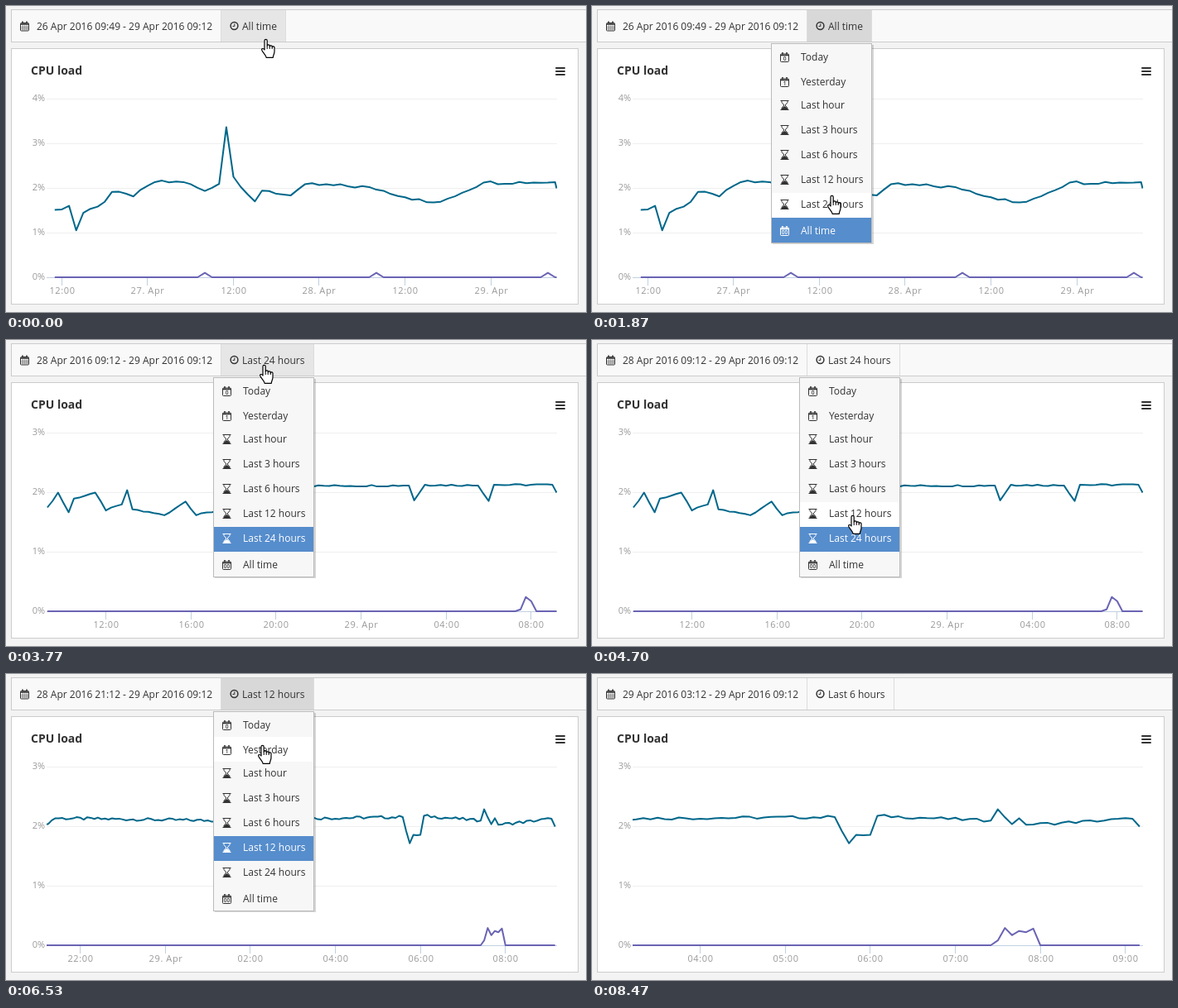
These frames come from a looping animation (700 px wide and 370 px high, 8.73 s). An HTML page:

```html
<!DOCTYPE html>
<html lang="en">
<head>
<meta charset="utf-8">
<title>CPU load</title>
<style>
  html, body { margin: 0; width: 100%; height: 100%; overflow: hidden; background: #f3f3f3; }
  svg { display: block; width: 700px; height: 370px; font: 12px "Open Sans", "Noto Sans", sans-serif; }
  .axis text { font-size: 11px; fill: #999; }
  .axis .time { letter-spacing: .6px; text-anchor: middle; }
  .line { fill: none; stroke-width: 2; stroke-linejoin: round; }
</style>
</head>
<body>
<svg viewBox="0 0 700 370" fill="#333">
  <defs>
    <clipPath id="plot"><rect x="49" y="100" width="616.5" height="231"/></clipPath>
    <g id="sheet" fill="none" stroke="currentColor">
      <rect x="-5" y="-4" width="10" height="9.5" rx="1"/>
      <path d="M-5 -2.5H5" stroke-width="1.6"/>
      <path d="M-2.5 -6V-3.5M2.5 -6V-3.5" stroke-width="1.6"/>
    </g>
    <g id="glass" stroke="currentColor" fill="none">
      <path d="M-5 -5.5H5M-5 5.5H5" stroke-width="1.2"/>
      <path d="M-3.5 -5V-3.5L-.6 0L-3.5 3.5V5M3.5 -5V-3.5L.6 0L3.5 3.5V5"/>
      <path d="M-3.5 5V3.5L0 1L3.5 3.5V5Z" fill="currentColor" stroke="none"/>
    </g>
  </defs>

  <rect x="6.5" y="4.5" width="720" height="39" fill="#f9f9f9" stroke="#ccc"/>
  <g transform="translate(22.5 24.5)" color="#333">
    <use href="#sheet"/>
    <path d="M-5 1H5M-5 3.2H5M-2.2 -2V5M.3 -2V5M2.8 -2V5" stroke="#333" stroke-width=".5"/>
  </g>
  <text id="dates" x="37" y="28.5"></text>
  <rect id="button" x="260" y="5" height="38"/>
  <path id="edges" stroke="#ddd" fill="none"/>
  <g fill="none" stroke="#333">
    <circle cx="275.5" cy="24" r="4.4" stroke-width="1.5"/>
    <path d="M275.8 21.5V24.5H273.5"/>
  </g>
  <text id="choice" x="285" y="28.5"></text>

  <rect x="6.5" y="51.5" width="684" height="309" fill="#fff" stroke="#ccc"/>
  <g id="titleHover">
    <rect x="22" y="62" width="606" height="31" rx="15" fill="#f5f5f5"/>
    <rect x="604" y="71.5" width="12.5" height="11.5" rx="2.5" fill="none" stroke="#c4709a" stroke-width="1.4"/>
    <path d="M608.5 80.5L609.2 77L617 69.3L620 72L612 79.8Z" fill="#e07a3c" stroke="#f5f5f5" stroke-width=".6"/>
  </g>
  <text x="30" y="83" font-size="14" font-weight="700">CPU load</text>
  <path d="M664 75H674M664 79H674M664 83H674" stroke="#333" stroke-width="2" stroke-linecap="round"/>
  <g id="tools">
    <g id="move" transform="translate(648 79)"></g>
    <path d="M683 348V353H678" fill="none" stroke="#999" stroke-width="1.6"/>
  </g>

  <g id="charts"></g>
  <path id="cross" stroke="#c0c0c0"/>
  <g id="loading">
    <rect x="22" y="97" width="653" height="255" fill="#e2e2e2" opacity=".45"/>
    <rect x="290.5" y="216.5" width="116" height="18" rx="2" fill="#f2983c" stroke="#dd6b4d"/>
    <text x="348.5" y="230" text-anchor="middle" fill="#fff">Loading more data</text>
  </g>
  <g id="menu"></g>

  <g id="cursor" fill="#fff" stroke="#000" stroke-linejoin="round">
    <path id="arrow" d="M.5 .5V16.5L4.1 13L6.8 19.2L9.2 18.2L6.6 12.1H11.5Z"/>
    <g id="hand" stroke-width="1.2">
      <path d="M-1 13V2A1.6 1.6 0 0 1 2.2 2V8A1.5 1.3 0 0 1 5.2 8.2V9A1.5 1.3 0 0 1 8.2 9.2V10A1.4 1.3 0 0 1 11 10.3V15C11 18 9.6 18.6 9.2 22.4H1.2C.8 19.8 -2 17.8 -4.2 13.4C-5 11.4 -2.6 10.6 -1 13Z"/>
      <path d="M2.2 8V12M5.2 9V12M8.2 10V12" fill="none" stroke-width="1"/>
    </g>
    <g id="pencil" stroke="none">
      <path d="M0 1L8 1.5L29 18.5L30.5 24L26 27L19.5 26L2 11Z" fill="#303030"/>
      <path d="M1.5 3H6.5L8 5L4 9.5L2.5 8Z" fill="#d8d8d8"/>
      <path d="M0 0H4V4H0Z" fill="#303030"/>
      <path d="M9 6L25 20M7 10L21 22" stroke="#666" stroke-dasharray="1.5 1.5"/>
    </g>
  </g>
</svg>

<script>
const LOOP = 8730, BASE = 328, LEFT = 49, RIGHT = 665, TOP = 112;
const $ = id => document.getElementById(id);
const show = (el, on) => { el.style.display = on ? "" : "none"; };

// Seeded noise in -1..1.
function noise(i) {
  const s = Math.sin((i + 1) * 12.9898) * 43758.5453;
  return 2 * (s - Math.floor(s)) - 1;
}

// Load in percent: straight runs between turning points, roughened in between.
function trace(keys, rough) {
  const values = [];
  keys.forEach(([end, to], k) => {
    const [start, from] = keys[k - 1] || [-1, to];
    for (let i = start + 1; i < end; i++)
      values.push(from + (to - from) * (i - start) / (end - start) + rough * noise(i));
    values.push(to);
  });
  return values;
}

const threeDays = trace([[0, 1.52], [2, 1.61], [3, 1.06], [4, 1.45], [7, 1.7], [8, 1.92], [11, 1.82],
  [14, 2.14], [18, 2.14], [21, 1.94], [23, 2.1], [24, 3.37], [25, 2.26], [28, 1.71], [29, 1.95],
  [33, 1.84], [35, 2.09], [44, 2.03], [52, 1.69], [54, 1.7], [60, 2.13], [70, 2.14]], .04);
const oneDay = trace([[0, 1.75], [2, 2], [4, 1.67], [5, 1.9], [9, 2], [11, 1.7], [14, 1.8], [15, 2.04],
  [16, 1.72], [22, 1.62], [26, 1.85], [28, 1.62], [39, 1.83], [41, 2.09], [43, 1.89], [46, 2.11],
  [68, 2.12], [69, 1.87], [71, 2.13], [81, 2.12], [83, 1.86], [84, 2.13], [95, 2.13]], .015);
const halfDay = trace([[0, 2.03], [3, 2.14], [62, 2.09], [63, 1.78], [64, 1.74], [66, 2.13], [101, 2.16],
  [103, 1.72], [104, 1.86], [106, 1.86], [107, 2.18], [123, 2.1], [124, 2.29], [126, 2.04],
  [127, 2.14], [128, 2.03], [143, 2.13], [144, 2]], .025);
const burst = i => [.08, .29, .17, .24, .22, .28][i] || 0;

// Hours count from 26 Apr 00:00; tick is the x of the first label, gap the distance between labels.
const charts = [
  { name: "All time", row: 7, from: "26 Apr 2016 09:49", edge: 337.5, max: 4, hour: 12, step: 12, tick: 67.45, gap: 103.515,
    first: 11, every: 1, load: threeDays, low: i => i % 24 === 21 ? .1 : 0, last: 2 },
  { name: "Last 24 hours", row: 6, from: "28 Apr 2016 09:12", edge: 371.5, max: 3, hour: 60, step: 4, tick: 120.5, gap: 102.66,
    first: 57.25, every: 1 / 4, load: oneDay, low: i => [.03, .24, .17][i - 89] || 0, last: 2 },
  { name: "Last 12 hours", row: 5, from: "28 Apr 2016 21:12", edge: 371.5, max: 3, hour: 70, step: 2, tick: 89.5, gap: 102.66,
    first: 69 + 1 / 6, every: 1 / 12, load: halfDay, low: i => burst(i - 124) },
  { name: "Last 6 hours", row: 4, from: "29 Apr 2016 03:12", edge: 364.5, max: 3, hour: 76, step: 1, tick: 130.5, gap: 102.66,
    first: 75 + 1 / 6, every: 1 / 12, load: halfDay.slice(72), low: i => burst(i - 52) }
];
const pointX = (c, i) => c.tick + (c.first + i * c.every - c.hour) * c.gap / c.step;

// Menu rounds: opened, button released, item chosen, data arrived.
const rounds = [
  { open: 470, release: 2030, pick: 2200, done: 2600 },
  { open: 3770, release: 4700, pick: 4900, done: 5300 },
  { open: 6200, release: 7230, pick: 7400, done: 7800 }
];

// Pointer stops: arrival time, x, y and, where it rests, the time it leaves.
const stops = [
  [0, 313, 40, 0], [200, 307, 32, 630], [1870, 289, 229, 2370], [2900, 291, 130],
  [3500, 311, 30, 3800], [4500, 314, 212, 4900], [5730, 301, 75], [5970, 309, 30, 6230],
  [6930, 309, 171, 7440], [8470, 74, 372, 8470]];
const leaves = stop => stop[3] ?? stop[0];

const items = ["Today", "Yesterday", "Last hour", "Last 3 hours", "Last 6 hours", "Last 12 hours", "Last 24 hours", "All time"];
const rowTop = i => 46 + 30 * i;
const isSheet = i => i < 2 || i === 7;

function timeLabel(hour) {
  const h = hour % 24;
  return h ? String(h).padStart(2, "0") + ":00" : 26 + hour / 24 + ". Apr";
}

function chartMarkup(c) {
  const unit = (BASE - TOP) / c.max;
  const line = (values, bottom) => {
    const points = values.map((v, i) => [pointX(c, i), bottom - v * unit]);
    return points.map(p => p.map(n => n.toFixed(1)));
  };
  const load = line(c.load, BASE + .5);
  if (c.last) load.push([664.5, BASE + .5 - c.last * unit]);
  const low = line(c.load.map((v, i) => c.low(i)), BASE);
  low.push([load[load.length - 1][0], BASE]);

  let axis = "";
  for (let k = 0; k <= c.max; k++) {
    const y = BASE + .5 - k * unit;
    axis += `<path d="M${LEFT} ${y}H${RIGHT}" stroke="${k ? "#efefef" : "#c0d0e0"}"/>
      <text x="47" y="${y + 2.5}" text-anchor="end">${k}%</text>`;
  }
  for (let i = 0; i < 6; i++) {
    const x = Math.floor(c.tick + i * c.gap) + .5;
    axis += `<path d="M${x} 328V338" stroke="#c0d0e0"/>
      <text class="time" x="${x + .5}" y="347.5">${timeLabel(c.hour + i * c.step)}</text>`;
  }
  return `<g><g class="axis">${axis}</g><g clip-path="url(#plot)">
    <polyline class="line" stroke="#6a64b4" points="${low.join(" ")}"/>
    <polyline class="line load" stroke="#00678a" points="${load.join(" ")}"/></g></g>`;
}

function menuMarkup() {
  const rows = items.map((name, i) => {
    const y = rowTop(i) + (isSheet(i) ? 16 : 14);
    const icon = isSheet(i)
      ? `<use href="#sheet"/><text y="4" font-size="6.5" font-weight="600" text-anchor="middle" fill="currentColor">${["0", "1"][i] || "00"}</text>`
      : `<use href="#glass"/>`;
    return `<g class="row"><rect x="1" y="${rowTop(i)}" width="120" height="30"/>
      <g transform="translate(16.5 ${y})">${icon}</g>
      <text x="36" y="${y + 4}" fill="currentColor">${name}</text></g>`;
  });
  return `<rect x="2" y="47" width="122" height="241" fill="#000" opacity=".16"/>
    <rect x=".5" y="45.5" width="121" height="241" fill="#f7f7f7" stroke="#bbb"/>${rows.join("")}`;
}

$("charts").innerHTML = charts.map(chartMarkup).join("");
$("menu").innerHTML = menuMarkup();
$("move").innerHTML = [0, 90, 180, 270].map(a =>
  `<path transform="rotate(${a})" d="M0 -7L3 -3.8H1V0H-1V-3.8H-3Z"/>`).join("");
const chartEls = [...$("charts").children];
const loadLines = chartEls.map(el => el.querySelector(".load"));
const rowEls = [...$("menu").querySelectorAll(".row")];

// Speed through a stop, zero where the pointer rests.
function slope(k, axis) {
  if (stops[k].length > 3) return 0;
  const a = stops[k - 1], b = stops[k + 1];
  return (b[axis] - a[axis]) / (b[0] - leaves(a));
}

function pointer(t) {
  const next = stops.findIndex(s => s[0] > t);
  if (next < 0) return stops[stops.length - 1].slice(1, 3);
  const a = stops[next - 1], b = stops[next], span = b[0] - leaves(a);
  const u = Math.max(0, (t - leaves(a)) / span), ease = u * u * (3 - 2 * u);
  return [1, 2].map(n => a[n] + (b[n] - a[n]) * ease
    + span * u * (1 - u) * (slope(next - 1, n) * (1 - u) - slope(next, n) * u));
}

function draw(t) {
  const [x, y] = pointer(t);
  const picked = rounds.filter(r => t >= r.pick).length;
  const loaded = rounds.filter(r => t >= r.done).length;
  const round = rounds.find(r => t >= r.open && t < r.pick);
  const choice = charts[picked];

  $("dates").textContent = choice.from + " - 29 Apr 2016 09:12";
  $("choice").textContent = choice.name;
  $("edges").setAttribute("d", `M259.5 5V43M${choice.edge} 5V43`);
  const onButton = x > 260 && x < choice.edge && y > 5 && y < 43;
  let shade = onButton ? "#e6e6e6" : "none";
  if (round) shade = t >= round.release ? "none" : t >= round.open + 160 ? "#d8d8d8" : "#e6e6e6";
  $("button").setAttribute("width", choice.edge - 260.5);
  $("button").setAttribute("fill", shade);

  const inPanel = !round && y > 51 && y < 360;
  const onTitle = inPanel && y > 62 && y < 93;
  const inPlot = inPanel && picked === loaded && x > LEFT && x < RIGHT && y > TOP && y < BASE;
  show($("tools"), inPanel);
  show($("titleHover"), onTitle);
  show($("loading"), picked !== loaded);

  chartEls.forEach((el, i) => show(el, i === loaded));
  loadLines[loaded].style.strokeWidth = inPlot ? 3 : 2;
  show($("cross"), inPlot);
  if (inPlot) {
    const c = charts[loaded], origin = pointX(c, 0);
    const nearest = Math.round((x - origin) / (pointX(c, 1) - origin));
    $("cross").setAttribute("d", `M${Math.floor(pointX(c, nearest)) + .5} ${TOP}V${BASE}`);
  }

  show($("menu"), round);
  if (round) {
    $("menu").setAttribute("transform", `translate(${picked ? 250 : 216} 0)`);
    rowEls.forEach((row, i) => {
      const active = i === choice.row, hover = y >= rowTop(i) && y < rowTop(i + 1);
      row.style.color = active ? "#fff" : "#333";
      row.firstChild.setAttribute("fill", active ? "#568dcc" : hover ? "#fff" : "none");
    });
  }

  const hand = round || onButton;
  show($("cursor"), t < 8470);
  $("cursor").setAttribute("transform", `translate(${Math.round(x)} ${Math.round(y)})`);
  show($("hand"), hand);
  show($("pencil"), onTitle);
  show($("arrow"), !hand && !onTitle);
}

const start = performance.now();
function frame() {
  draw((performance.now() - start) % LOOP);
  requestAnimationFrame(frame);
}
frame();
</script>
</body>
</html>
```
